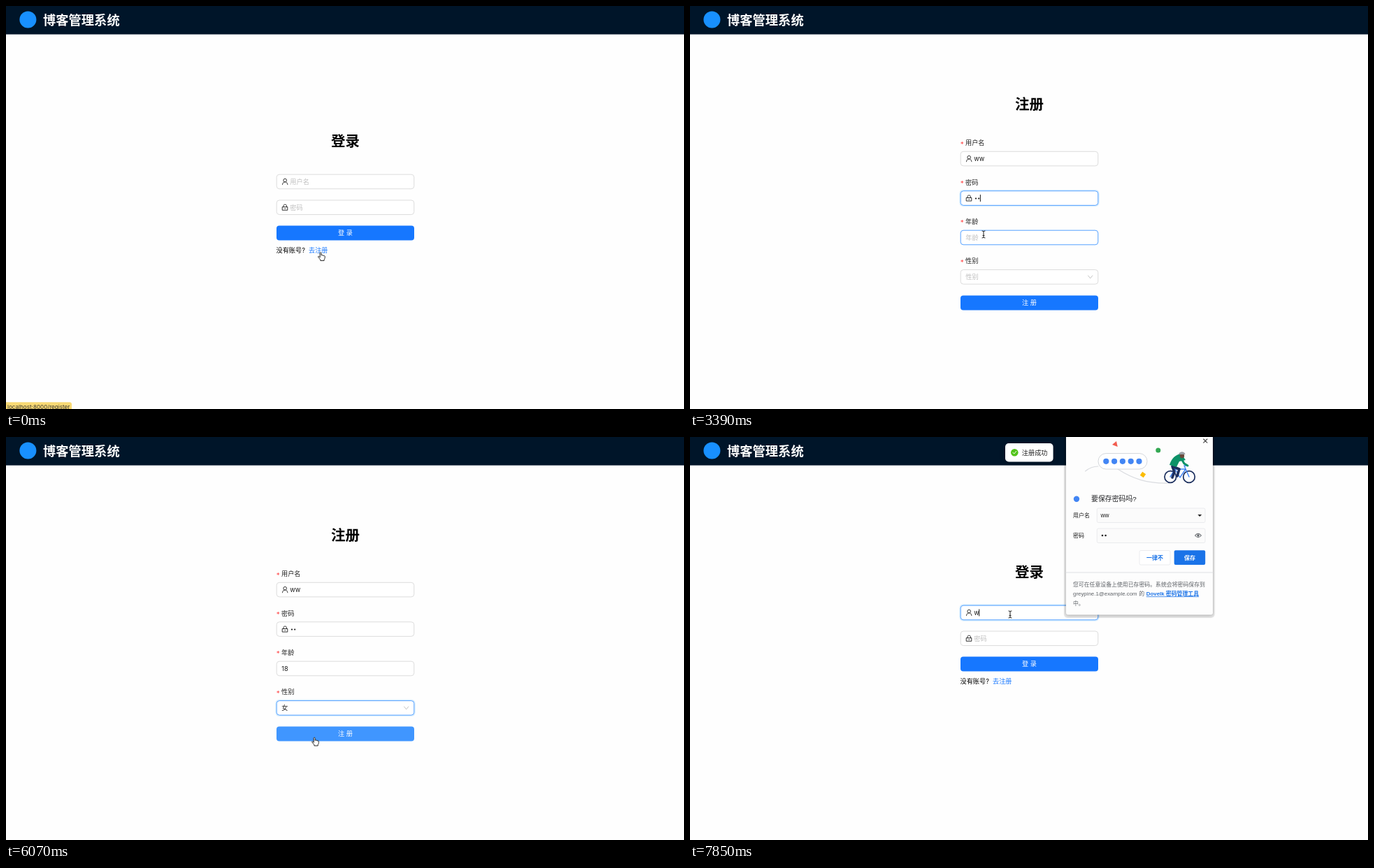
Write an HTML page that moves like this. It is 970 by 577 pixels and loops after 7990 ms.

```html
<!DOCTYPE html>
<html lang="zh-CN">
<head>
<meta charset="utf-8">
<style>
html, body { margin: 0; width: 100%; height: 100%; overflow: hidden; background: #fefefe; }
svg { display: block; font-family: Inter, 'Noto Sans CJK SC', 'Noto Sans CJK', sans-serif; }
text { white-space: pre; }
.ui { font-family: 'Liberation Sans', 'Noto Sans CJK SC', 'Noto Sans CJK', sans-serif; }
.lift { filter: drop-shadow(0 1px 2px #0004); }
.float { filter: drop-shadow(0 3px 4px #0002); }
</style>
</head>
<body>
<svg id="stage" width="970" height="577" viewBox="0 0 970 577"></svg>
<script>
const LOOP = 7990, STEP = 148;
const INK = '#1f1f1f', HINT = '#bfbfbf', BLUE = '#1677ff', SKY = '#4096ff', LINE = '#d9d9d9';
const stage = document.getElementById('stage');

// Pointer path: time, x, y
const path = [
  [0, 450, 353], [750, 450, 353], [1480, 444, 221], [2370, 444, 221], [2960, 425, 275],
  [3260, 425, 275], [3400, 420, 327], [3540, 420, 331], [4140, 420, 331], [4580, 421, 388],
  [4730, 421, 388], [5030, 424, 427], [5320, 414.5, 434], [5770, 414.5, 434], [6360, 467, 427],
  [6820, 467, 427], [7400, 466, 401], [7560, 466, 401], [7690, 458, 254], [LOOP, 458, 254]
];

function pointer(t) {
  t = Math.floor((t + 15) / STEP) * STEP;
  const i = Math.max(1, path.findIndex(k => k[0] >= t));
  const [a, b] = [path[i - 1], path[i]];
  const p = (t - a[0]) / (b[0] - a[0]), e = p * p * (3 - 2 * p);
  return { x: a[1] + (b[1] - a[1]) * e, y: a[2] + (b[2] - a[2]) * e };
}

const rect = (x, y, w, h, r, fill, more = '') =>
  `<rect x="${x}" y="${y}" width="${w}" height="${h}" rx="${r}" fill="${fill}" ${more}/>`;
const dot = (x, y, r, fill, more = '') => `<circle cx="${x}" cy="${y}" r="${r}" fill="${fill}" ${more}/>`;
const line = (d, color, w = 1, fill = 'none') =>
  `<path d="${d}" fill="${fill}" stroke="${color}" stroke-width="${w}" stroke-linejoin="round" stroke-linecap="round"/>`;
const shape = (d, fill) => `<path d="${d}" fill="${fill}"/>`;
// Text placed by the middle of its line
const text = (x, cy, s, fill = INK, size = 9.2, more = '') =>
  `<text x="${x}" y="${cy + size * .36}" font-size="${size}" fill="${fill}" ${more}>${s}</text>`;
const mid = 'text-anchor="middle"', bold = 'font-weight="600"';
const move = (x, y, s) => `<g transform="translate(${x} ${y})">${s}</g>`;

const icons = {
  user: line('M-3.7 4.2C-3.5 -1 3.5 -1 3.7 4.2', INK, .9) + dot(0, -1.9, 2.3, '#fff', `stroke="${INK}" stroke-width=".9"`),
  lock: line('M-3.6 -.6H3.6V4H-3.6ZM-2.2 -.6V-2.4C-2.2 -4.7 2.2 -4.7 2.2 -2.4V-.6M0 1.2V2.2', INK, .9)
};

const cursors = {
  arrow: line('M0 0V9L2 7.2L3.6 10.6L5.2 9.9L3.7 6.6H6.5Z', '#fff', .7, '#000'),
  beam: line('M-2 -5Q0 -5 0 -3.8Q0 -5 2 -5M0 -4V4M-2 5Q0 5 0 3.8Q0 5 2 5M-1 1.5H1', '#222', 1),
  hand: line('M-1 .8C-1 -.6 1 -.6 1 .8V4C1.3 3.1 2.8 3.2 2.9 4.3C3.4 3.6 4.6 3.8 4.7 4.8' +
    'C5.4 4.3 6.4 4.8 6.3 5.8C6.3 8 6 9 5.1 10V11.6H-.2V10.3C-1.2 9.2-2 7.8-3.3 6.4C-3.8 5.2-2.6 4.7-1 6.6Z', '#111', .9, '#fff')
};

function box(cy, hover, focus) {
  const ring = focus ? rect(386, cy - 11.4, 199, 22.8, 5, 'none', 'stroke="#0591ff" stroke-opacity=".15" stroke-width="1.6"') : '';
  return ring + rect(387.2, cy - 10.3, 196.6, 20.6, 4, '#fff', `stroke="${hover || focus ? SKY : LINE}" stroke-width=".9"`);
}

function field(cy, at, o) {
  const x = o.icon ? 406.3 : 394.3, n = o.value.length;
  let s = box(cy, Math.abs(at.y - cy) < 10.5, o.focus);
  if (o.icon) s += move(399.2, cy, icons[o.icon]);
  if (o.secret) for (let i = 0; i < n; i++) s += dot(409 + 4.2 * i, cy + .5, 1.1, INK);
  else s += text(x, cy, o.value, INK);
  if (!n) s += text(x, cy, o.hint, HINT);
  if (o.focus) s += rect(x + n * o.pitch, cy - 5, .9, 10, 0, '#000');
  return s;
}

function button(cy, label, hover, wave) {
  return (wave ? rect(385, cy - 12.5, 201, 25, 6, '#4096ff', 'opacity=".2"') : '') +
    rect(387, cy - 10.4, 197, 20.8, 4, hover ? SKY : BLUE) + text(485.5, cy, label, '#fff', 9.2, mid + ' font-weight="500"');
}

const title = (cy, s) => text(485.5, cy, s, '#000', 20.5, mid + ' ' + bold);
const label = (cy, s) => text(386.8, cy + 2, '*', '#ff4d4f', 10) + text(394, cy, s);

function login(t, at) {
  const on = t >= 7700;
  return title(193.5, '登录') +
    field(251.5, at, { icon: 'user', value: t >= 7850 ? 'w' : '', hint: '用户名', focus: on, pitch: 7 }) +
    field(288.3, at, { icon: 'lock', value: '', hint: '密码' }) +
    button(325, '登 录') +
    text(386.5, 350, '没有账号?', '#000') + text(433, 350, '去注册', BLUE);
}

function register(t, at) {
  const typed = (s, ...times) => s.slice(0, times.filter(k => t >= k).length);
  const focus = t < 1640 ? '' : t < 3100 ? 'name' : t < 3690 ? 'pass' : t < 4730 ? 'age' : t < 6370 ? 'sex' : '';
  const open = t >= 4730 && t < 5780, picked = t >= 5630;
  const away = open ? { x: 0, y: 0 } : at;
  let s = title(141, '注册') +
    label(196, '用户名') + label(252.5, '密码') + label(308.7, '年龄') + label(365, '性别') +
    field(218.6, at, { icon: 'user', value: typed('ww', 2070, 2220), hint: '用户名', focus: focus == 'name', pitch: 7 }) +
    field(275.1, at, { icon: 'lock', value: typed('ww', 3250, 3390), hint: '密码', focus: focus == 'pass', pitch: 4.3, secret: true }) +
    field(331.5, at, { value: typed('18', 3990, 4140), hint: '年龄', focus: focus == 'age', pitch: 5.2 }) +
    box(387.9, Math.abs(away.y - 388) < 10.5, focus == 'sex') +
    text(394.3, 387.9, picked ? '女' : '性别', picked ? INK : HINT) +
    line('M569.6 386L572.7 390L575.8 386', HINT, .9) +
    button(425, '注 册', Math.abs(away.y - 425) < 11, t >= 6450);
  if (t >= 1780 && t < 2220) s += suggestions(t >= 2070);
  if (open) s += options(at, t < 4880 || picked ? .6 : 1);
  return s;
}

function suggestions(fading) {
  const rows = ['mm', 'mx', 'ss', 'ff', 'qq'].map((s, i) => text(480, 246.5 + 23.7 * i, s, INK, 8.8)).join('');
  return `<g opacity="${fading ? .6 : 1}"><g class="lift">` +
    shape('M475 232H481L485.5 229L490 232H508Q511 232 511 235V352Q511 355 508 355H475Q472 355 472 352V235Q472 232 475 232Z', '#fff') +
    `</g>${rows}</g>`;
}

function options(at, alpha) {
  const y = at.y > 425 ? 425 : 404;
  return `<g opacity="${alpha}">` + rect(380.5, 404, 209.5, 56, 14, '#f5f5f5') +
    `<g class="float">${rect(387, 401.5, 197, 46.8, 5, '#fff')}</g>` +
    rect(389.7, y, 191.6, 21, 3, '#f5f5f5') + text(397.3, 414.3, '男') + text(397.3, 435.6, '女') + '</g>';
}

function toast(t) {
  const late = t >= 6960;
  return move(451, late ? 9 : 2, `<g class="float" opacity="${late ? 1 : .85}">` + rect(0, 0, 68.6, 26.4, 5, '#fff') +
    dot(13.3, 13.2, 5.3, '#52c41a') + line('M10.9 13.2L12.7 15.1L15.7 11.4', '#fff', 1) + text(23.8, 13.2, '注册成功') + '</g>');
}

function rider() {
  const navy = '#1c2f5e', wheel = x => dot(x, 57, 8.3, 'none', `stroke="${navy}" stroke-width="1.7"`);
  return wheel(687.3) + wheel(714) +
    line('M687 57L694 46H709L701 58L694 46M714 57L707 41H711', '#4285f4', 1.4) +
    line('M690 42L700 46L697 56M690 42L693 50L690 58', navy, 3.6) +
    shape('M686 40C689 31 694 25 703 24L709 33L700 35L696 43Z', '#0d9268') +
    line('M703 31L707 38L712 41', '#0d9268', 3) +
    dot(704, 27, 3.2, '#6b4a3c') + shape('M699 25C700 20 708 20 708.500 25Z', '#9aa0a6');
}

function savePrompt() {
  const edge = 'stroke="#e6e8eb" stroke-width=".8"', grey = '#5f6368', link = '#1a73e8';
  let s = `<g class="ui">` + rect(535, -8, 215.5, 267, 5, '#000', 'opacity=".09"') +
    `<g class="lift">${rect(538, -6, 210, 260.5, 3, '#fdfdfd')}</g>` +
    line('M565.5 49C572 43.500 578 42 584 42M612 46C634 60 654 67 686 66', '#dadce0', 1.1) +
    rect(584, 23.5, 70, 22.5, 11.2, '#fff', 'stroke="#d5d8dc"') +
    shape('M604 11L610 6L611.800 14Z', '#f25c4f') + dot(669.8, 19, 3.5, '#34a853') +
    rect(645, 51, 6, 6, 0, '#fbbc04', 'transform="rotate(35 648 54)"') + rider();
  for (let i = 0; i < 5; i++) s += dot(595.3 + 11.8 * i, 34.8, 4.1, '#4285f4');
  return s + line('M734.700 3L739.900 8.200M739.900 3L734.700 8.200', '#444', 1.1) +
    dot(553, 88.8, 4.2, '#4285f4') + text(574, 88.5, '要保存密码吗?', '#202124', 9.9) +
    text(548, 112, '用户名', INK, 8) + text(548, 141, '密码', INK, 8) +
    rect(582.3, 102, 154.7, 20.5, 2, '#fbfbfb', edge) + rect(582.3, 131, 154.7, 20.5, 2, '#fbfbfb', edge) +
    text(587.5, 112, 'ww', INK, 8.4) + shape('M726.400 111H732.200L729.300 114Z', '#222') +
    dot(590, 141, 1.3, INK) + dot(594.6, 141, 1.3, INK) +
    line('M722.600 141Q727 135.500 731.400 141Q727 146.500 722.600 141Z', grey, 1.1) + dot(727, 141, 1.7, grey) +
    rect(643, 162.5, 44, 20.5, 2, '#fff', edge) + text(665, 172.7, '一律不', link, 8, mid + ' ' + bold) +
    rect(692.7, 162.3, 44.5, 20.8, 2, link) + text(715, 172.7, '保存', '#fff', 8, mid + ' ' + bold) +
    line('M538 194H748', '#dcdee1', .9) +
    text(548, 211.3, '您可在任意设备上使用已存密码。系统会将密码保存到', grey, 7.88) +
    text(548, 224.5, 'greypine.1@example.com', grey, 7.88) + text(642.3, 224.5, '的', grey, 7.88) +
    text(652.8, 224.5, 'Dovelk 密码管理工具', link, 7.88, bold + ' text-decoration="underline"') +
    text(548, 238, '中。', grey, 7.88) + '</g>';
}

function cursorKind(t, { x, y }, signup) {
  const row = cy => x > 387 && x < 584 && Math.abs(y - cy) < 10.5;
  if (!signup) return row(251.5) || row(288.3) ? 'beam' : row(325) || (row(350) && x > 432 && x < 461) ? 'hand' : 'arrow';
  if (t >= 6450) return 'arrow';
  if (t >= 4730 && t < 5780) return 'hand';
  return [218.6, 275.1, 331.5].some(row) ? 'beam' : row(388) || row(425) ? 'hand' : 'arrow';
}

function scene(t) {
  const at = pointer(t), signup = t >= 600 && t < 6670;
  let s = rect(0, 0, 970, 577, 0, '#fefefe') + rect(0, 0, 970, 40.6, 0, '#001529') +
    dot(31.4, 19.6, 12, '#1890ff') + text(53, 20, '博客管理系统', '#fff', 18.3, bold) +
    (signup ? register : login)(t, at);
  if (t < 1190) s += rect(-4, 567.3, 98, 14, 3, '#f8d974') + text(2, 574.3, 'localhost:8000/register', '#3c3a30', 8.1);
  if (t >= 6820) s += toast(t) + savePrompt();
  return s + move(at.x, at.y, cursors[cursorKind(t, at, signup)]);
}

let last = '';
function frame(now) {
  const s = scene(now % LOOP);
  if (s !== last) stage.innerHTML = last = s;
  requestAnimationFrame(frame);
}
frame(0);
</script>
</body>
</html>
```
